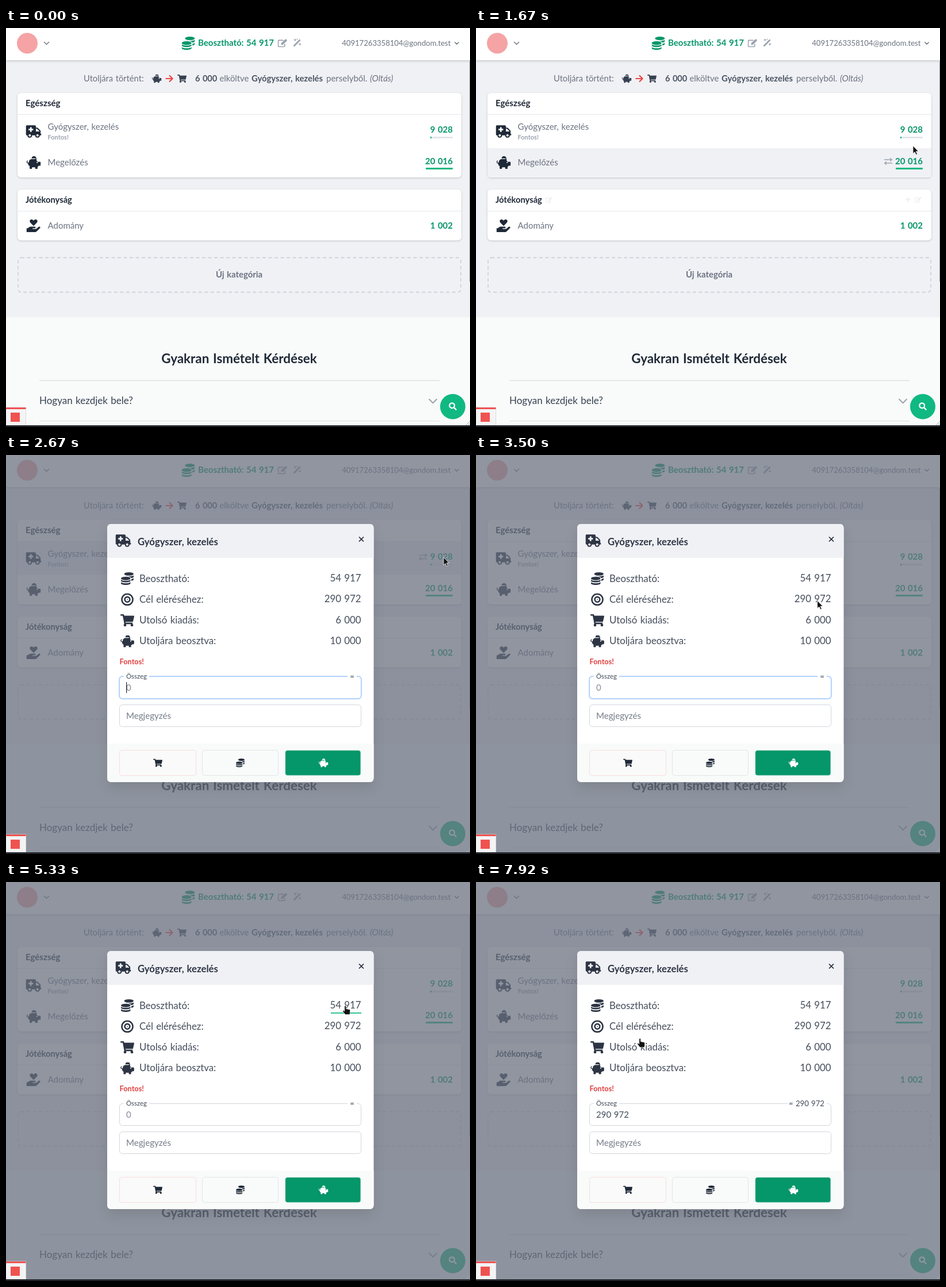
Write an HTML page that moves like this. It is 807 px wide and 694 px high and loops after 8000 ms.

```html
<!DOCTYPE html>
<html lang="hu">
<head>
<meta charset="utf-8">
<style>
  html, body { margin: 0; width: 100%; height: 100%; overflow: hidden; background: #f0f1f5; }
  svg { display: block; }
  text { font-family: Lato, "Open Sans", sans-serif; word-spacing: .06em; white-space: pre; }
  .card { fill: #fff; filter: drop-shadow(0 1px 1.5px rgba(0, 0, 0, .2)); }
</style>
</head>
<body>
<svg id="stage" width="807" height="694" viewBox="0 0 807 694">
  <defs>
    <symbol id="pig" viewBox="0 0 576 512">
      <path fill="currentColor" fill-rule="evenodd" d="M96 224C104 158 155 118 224 118H330C350 104 375 96 416 96L401 162C425 180 440 200 449 224H544c18 0 32 14 32 32v96c0 18-14 32-32 32h-43c-15 20-30 32-53 46v66c0 9-7 16-16 16h-64c-9 0-16-7-16-16v-48H224v48c0 9-7 16-16 16h-64c-9 0-16-7-16-16v-98C90 385 64 345 64 288H50C18 284 0 260 0 232C0 200 24 176 56 176v32C40 208 32 218 32 232c0 14 10 24 24 24h34zM432 224a24 24 0 1 0 1 0z"/>
      <path fill="currentColor" d="M208 94a96 96 0 0 1 192-4c-60-2-130-6-192 4z"/>
    </symbol>
    <symbol id="truck" viewBox="0 0 640 512">
      <path fill="currentColor" fill-rule="evenodd" d="M624 352h-16V244q0-20-14-34L494 110q-14-14-34-14h-44V48q0-48-48-48H48Q0 0 0 48v320q0 48 48 48h16a96 96 0 0 0 192 0h128a96 96 0 0 0 192 0h48q16 0 16-16v-32q0-16-16-16zM160 464a48 48 0 1 1 1 0zM480 464a48 48 0 1 1 1 0zM416 144h44l100 100v12H416zM176 80h64v64h64v64h-64v64h-64v-64h-64v-64h64z"/>
    </symbol>
    <symbol id="coins" viewBox="0 0 512 512">
      <g fill="currentColor">
        <ellipse cx="320" cy="68" rx="192" ry="68"/>
        <path d="M512 128v52c0 26-36 44-90 56c-20-40-110-72-190-70l-60-20c40 14 90 22 148 22c80 0 150-14 192-40z"/>
        <path d="M512 240v50c0 24-40 46-96 56v-66c40-8 74-22 96-40z"/>
        <ellipse cx="192" cy="250" rx="192" ry="70"/>
        <path id="band" d="M0 300c40 30 110 46 192 46s152-16 192-46v42c0 38-86 66-192 66S0 380 0 342z"/>
        <use href="#band" y="104"/>
      </g>
    </symbol>
    <symbol id="cart" viewBox="0 0 576 512">
      <path fill="currentColor" d="M24 0h102q20 0 24 19l9 45h393q28 0 23 29l-47 208q-4 19-23 19H212l6 32h269q27 0 23 29l-6 36H164L94 64H24Q0 64 0 40V24Q0 0 24 0z"/>
      <g fill="currentColor"><circle cx="192" cy="456" r="56"/><circle cx="480" cy="456" r="56"/></g>
    </symbol>
    <symbol id="give" viewBox="0 0 576 512">
      <path fill="currentColor" d="M275 250L160 134C120 90 126 34 164 10c38-24 82-8 124 34c42-42 86-58 124-34c38 24 44 80 4 124L301 250q-13 12-26 0z"/>
      <path fill="currentColor" d="M0 352h56l46-38q36-26 74-26h160c24 0 40 22 32 44c-6 14-18 20-32 20h-80q-14 0-14 16t14 16h110q22 0 36-12l94-76c38-24 80 14 58 48L408 488q-26 24-56 24H16q-16 0-16-16z"/>
    </symbol>
    <symbol id="goal" viewBox="0 0 24 24">
      <g fill="none" stroke="currentColor" stroke-width="2.8"><circle cx="12" cy="12" r="10.4"/><circle cx="12" cy="12" r="4.8"/></g>
      <circle cx="12" cy="12" r="1" fill="currentColor"/>
    </symbol>
    <symbol id="arrow" viewBox="0 0 16 16">
      <path fill="none" stroke="currentColor" stroke-width="2.3" stroke-linecap="round" stroke-linejoin="round" d="M2 8H14M8.6 2.6L14 8L8.6 13.4"/>
    </symbol>
    <symbol id="swap" viewBox="0 0 16 14">
      <path fill="none" stroke="currentColor" stroke-width="1.4" d="M1 4H14M11 1.2L14.4 4L11 6.8M15 10H2M5 7.2L1.6 10L5 12.8"/>
    </symbol>
    <symbol id="edit" viewBox="0 0 18 16">
      <path fill="none" stroke="currentColor" stroke-width="1.8" stroke-linecap="round" d="M10 3H2.4Q1 3 1 4.4V13.6Q1 15 2.4 15H11.6Q13 15 13 13.6V10.5"/>
      <path fill="currentColor" d="M13.8 1.2q1-.9 2 0l1 1q.9 1 0 2L9.8 11.2l-3.6.5l.4-3.4z"/>
    </symbol>
    <symbol id="wand" viewBox="0 0 16 16">
      <path stroke="currentColor" stroke-width="3" stroke-linecap="round" d="M2.5 13.5L12.5 3.5"/>
      <path fill="currentColor" d="M4 0l.8 2.2L7 3l-2.2.8L4 6l-.8-2.2L1 3l2.2-.8zM13 8l.8 2.2l2.2.8l-2.2.8L13 14l-.8-2.2L10 11l2.2-.8zM8 0l.5 1.2l1.2.5l-1.2.5L8 3.4l-.5-1.2l-1.2-.5l1.2-.5z"/>
    </symbol>
    <symbol id="down" viewBox="0 0 16 16">
      <path fill="none" stroke="currentColor" stroke-width="1.9" stroke-linecap="round" stroke-linejoin="round" d="M2 5L8 11L14 5"/>
    </symbol>
    <symbol id="find" viewBox="0 0 16 16">
      <path fill="none" stroke="currentColor" stroke-width="2.6" stroke-linecap="round" d="M10.2 10.2L14.5 14.5M11.5 6.5a5 5 0 1 0-10 0a5 5 0 1 0 10 0"/>
    </symbol>
    <symbol id="plus" viewBox="0 0 16 16">
      <path stroke="currentColor" stroke-width="3" d="M8 1V15M1 8H15"/>
    </symbol>
  </defs>
</svg>
<script>
const stage = document.getElementById('stage');
const DARK = '#1f2937', INK = '#374151', SOFT = '#434c5a', GRAY = '#6b7280', PALE = '#9ca3af';
const GREEN = '#059669', MINT = '#10b981';

const icon = (id, cx, cy, w, color, h = w) =>
  `<use href="#${id}" x="${cx - w / 2}" y="${cy - h / 2}" width="${w}" height="${h}" color="${color}"/>`;
const text = (x, y, size, color, str, weight = 400, anchor = 'start', more = '') =>
  `<text x="${x}" y="${y}" font-size="${size}" fill="${color}" font-weight="${weight}" text-anchor="${anchor}" ${more}>${str}</text>`;
const rect = (x, y, w, h, fill, more = '') =>
  `<rect x="${x}" y="${y}" width="${w}" height="${h}" fill="${fill}" ${more}/>`;
const group = (id, inner) => `<g id="${id}">${inner}</g>`;
const box = (y, stroke, more = '') =>
  rect(197.5, y, 420, 38, '#fff', `rx="5" stroke="${stroke}" ${more}`);

const header =
  rect(0, 0, 807, 56, '#fff', 'style="filter:drop-shadow(0 1px 2px rgba(0,0,0,.22))"') +
  '<circle cx="37" cy="26.5" r="18" fill="#f5a3a4"/>' +
  icon('down', 70.5, 26.5, 11, GRAY) +
  icon('coins', 317, 26.5, 23, GREEN) +
  text(334, 31, 15, GREEN, 'Beosztható: 54 917', 700) +
  icon('edit', 481, 26, 17, PALE, 15) + icon('wand', 506.5, 25.5, 15, PALE) +
  text(773.5, 31, 13.1, GRAY, '40917263358104@gondom.test', 400, 'end') +
  icon('down', 784, 26.5, 9, INK);

const lastEvent =
  text(135, 93, 14.7, GRAY, 'Utoljára történt:') +
  icon('pig', 262, 88, 17, INK, 15) + icon('arrow', 284, 88, 15, '#ef4444') + icon('cart', 306, 88, 16, INK, 14.5) +
  text(329, 93, 14.6, '#4b5563', '6 000', 700) +
  text(371.5, 93, 14.8, GRAY, 'elköltve') +
  text(427, 93, 14.8, '#4b5563', 'Gyógyszer, kezelés', 700) +
  text(557, 93, 15, GRAY, 'perselyből.') +
  text(633, 93, 15, GRAY, '(Oltás)', 400, 'start', 'font-style="italic"');

const hover = (id, y, h, swapX, swapY) =>
  group(id, rect(20, y, 772, h, '#f0f1f5') + icon('swap', swapX, swapY, 16, PALE, 14));

const cards =
  rect(20, 113, 772, 147, '#fff', 'rx="6" class="card"') +
  hover('rowCare', 151, 57.5, 725.5, 177.5) + hover('rowPrevent', 209, 50.5, 717, 232) +
  rect(20, 150, 772, 1, '#e5e7eb') +
  text(34, 136, 15.1, DARK, 'Egészség', 700) +
  icon('truck', 48, 180, 27, DARK, 22) +
  text(72.5, 177, 15, GRAY, 'Gyógyszer, kezelés') + text(72.5, 194, 11, PALE, 'Fontos!', 700) +
  text(777, 182, 15, GREEN, '9 028', 700, 'end') +
  rect(738, 189, 39, 3, '#e2e5e9', 'rx="1"') + rect(738, 189, 2, 3, MINT) +
  icon('pig', 48, 234, 25, DARK, 22) + text(72.5, 239, 15, GRAY, 'Megelőzés') +
  text(777, 237, 15, GREEN, '20 016', 700, 'end') + rect(730, 243, 47, 3, MINT, 'rx="1"') +
  rect(20, 281, 772, 88.5, '#fff', 'rx="6" class="card"') +
  hover('rowGift', 319, 50, 726, 343) +
  rect(20, 318, 772, 1, '#e5e7eb') +
  text(34, 304, 14.7, DARK, 'Jótékonyság', 700) +
  group('tools', icon('edit', 127, 299, 12, PALE) + icon('plus', 751, 298.5, 10, PALE) + icon('edit', 769, 298.5, 12, PALE)) +
  icon('give', 48, 344, 25, DARK, 22) + text(72.5, 348.5, 15, GRAY, 'Adomány') +
  text(777, 348.5, 15, GREEN, '1 002', 700, 'end') +
  rect(21, 399.5, 770, 60, 'none', 'rx="5" stroke="#d0d3d9" stroke-width="1.8" stroke-dasharray="6 4.5"') +
  text(405.5, 434, 14.9, GRAY, 'Új kategória', 700, 'middle');

const faq =
  rect(0, 503, 807, 191, '#f9fbfa') +
  text(405.5, 583, 22.4, DARK, 'Gyakran Ismételt Kérdések', 700, 'middle') +
  rect(58, 612.5, 696, 1.5, '#dfe2e5') +
  text(58, 654, 17, INK, 'Hogyan kezdjek bele?') +
  icon('down', 742.5, 649, 17, PALE) +
  rect(58, 683, 696, 1.2, '#dfe2e5') +
  `<circle cx="777" cy="658.5" r="22" fill="${MINT}"/>` + icon('find', 777, 658, 14, '#fff');

const infoRows = [
  ['coins', 'Beosztható:', '54 917', 22], ['goal', 'Cél eléréséhez:', '290 972', 22],
  ['cart', 'Utolsó kiadás:', '6 000', 22], ['pig', 'Utoljára beosztva:', '10 000', 21]
].map(([id, label, value, h], i) => {
  const y = 215 + i * 36.3;
  return icon(id, 211, y, id === 'goal' ? 22 : 24, '#2d3544', h) +
    text(232, y + 5.5, 16.8, SOFT, label) + text(617.5, y + 5, 16.8, SOFT, value, 400, 'end');
}).join('');

const buttons =
  rect(197.5, 513.5, 133, 44, '#fafafa', 'rx="4" stroke="#f8dede"') + icon('cart', 264, 535.5, 16, DARK, 14.5) +
  rect(341.5, 513.5, 132, 44, '#f9fafa', 'rx="4" stroke="#e2e4e8"') + icon('coins', 407.5, 535.5, 15, DARK) +
  rect(486, 514, 130.5, 43, GREEN, 'rx="3.5" stroke="#5dba9c" stroke-width=".8"') + icon('pig', 552, 535.5, 17, '#fff', 15);

const modal =
  rect(0, 0, 807, 694, '#6b7280', 'opacity=".75"') +
  rect(176, 120, 463.5, 449, '#fff', 'rx="7" style="filter:drop-shadow(0 10px 10px rgba(0,0,0,.1))"') +
  '<path fill="#f0f1f5" d="M176 179V127q0-7 7-7H632.5q7 0 7 7V179z"/>' +
  '<path fill="#f9fafa" d="M176 502V562q0 7 7 7H632.5q7 0 7-7V502z"/>' +
  icon('truck', 204, 149, 27, '#2d3544', 22) +
  text(229, 157, 16.7, '#2d3544', 'Gyógyszer, kezelés', 700) +
  '<path stroke="#1f2937" stroke-width="1.7" d="M614 142.5L622 150.5M622 142.5L614 150.5"/>' +
  infoRows +
  rect(565, 227, 53, 1.7, MINT, 'id="lineAll"') + rect(555, 263.3, 63, 1.7, MINT, 'id="lineGoal"') +
  text(197.5, 364, 12.8, '#e0403f', 'Fontos!', 700) +
  box(385.5, '#d1d5db') +
  group('focus', box(385.5, '#a4cafe', 'stroke-width="3.4" stroke-opacity=".6"') + box(385.5, '#a4cafe')) +
  rect(205, 382, 44, 6, '#fff') + text(209, 389, 11.4, SOFT, 'Összeg') +
  rect(0, 382, 0, 6, '#fff', 'id="sumGap"') + text(606, 390, 13.2, SOFT, '=', 400, 'end', 'id="sum"') +
  text(209, 410, 15, SOFT, '0', 400, 'start', 'id="amount"') +
  rect(209, 395, 1.2, 19, DARK, 'id="caret"') +
  box(434.5, '#d1d5db') + text(209, 459, 15.1, '#757c88', 'Megjegyzés') +
  buttons;

const corner =
  rect(0, 660, 34.5, 31, '#f4f4f5', 'stroke="#dcdcdf"') + rect(0, 660, 34.5, 3, '#ef5350') +
  rect(8, 669, 16, 16, '#ef5350') +
  '<path stroke="#9ca3af" d="M800 691L807 684M804 691L807 688"/>' +
  rect(0, 691, 807, 3, '#22262b');

const pointers =
  group('arrowTip', '<path fill="#111" stroke="#fff" stroke-width=".8" d="M0 0V13.5L3.2 10.7L5.4 15.5L7.6 14.5L5.4 9.8H9.6z"/>') +
  group('handTip', '<path fill="#111" stroke="#fff" stroke-width=".6" d="M-1.2 1q1.3-2 2.6 0V5.5l6 1.2q1.4.6 1.2 2L8 15.5H0L-4.5 9.5q.8-1.6 2.4-.6l.9.9z"/>');

stage.insertAdjacentHTML('beforeend',
  rect(0, 0, 807, 694, '#f0f1f5') + faq + header + lastEvent + cards +
  rect(806, 57, 1, 384, '#a0a4ab') + group('modal', modal) + corner + pointers);

const el = {};
stage.querySelectorAll('[id]').forEach(n => el[n.id] = n);

const STEP = 1000 / 12, LOOP = 8000;
// time, x, y of the pointer's hot spot
const path = [
  [83, 786, 645], [420, 779, 560], [830, 770, 366], [1170, 766, 325], [1330, 763, 296],
  [1500, 761, 262], [1667, 760, 205], [1830, 760, 188], [2083, 761, 178], [3167, 761, 178],
  [3917, 361, 358], [4170, 361, 358], [5083, 590, 215], [5917, 590, 215], [6500, 586, 249],
  [7500, 586, 249], [7917, 285, 272], [8000, 270, 274]
];

function pointerAt(t) {
  const i = Math.max(1, path.findIndex(p => p[0] >= t));
  const [t0, x0, y0] = path[i - 1], [t1, x1, y1] = path[i];
  let k = Math.min(1, Math.max(0, (t - t0) / (t1 - t0)));
  if (t0 > 3000) k = k * k * (3 - 2 * k);
  return [x0 + (x1 - x0) * k, y0 + (y1 - y0) * k];
}

const show = (node, on) => node.setAttribute('visibility', on ? 'inherit' : 'hidden');
const span = (t, a, b) => t >= a && t < b;

function draw(now) {
  const t = Math.floor((now % LOOP + 5) / STEP) * STEP + 1;
  const [x, y] = pointerAt(t);
  const hand = t > 4910;
  for (const n of [el.arrowTip, el.handTip]) n.setAttribute('transform', `translate(${x} ${y})`);
  show(el.arrowTip, t > 80 && !hand);
  show(el.handTip, hand);

  show(el.rowGift, span(t, 830, 1245));
  show(el.rowPrevent, span(t, 1580, 1745));
  show(el.rowCare, span(t, 1745, 3245));
  const fade = t < 1495 ? (t - 1245) / 160 : (1750 - t) / 250;
  el.tools.setAttribute('opacity', Math.min(1, Math.max(0, fade)) * .5);

  show(el.modal, t > 2660);
  show(el.lineAll, span(t, 4910, 6080));
  show(el.lineGoal, span(t, 6080, 7660));
  show(el.focus, t < 5330);
  show(el.caret, t < 5330 && Math.floor((t - 2667) / 500) % 2 === 0);

  const value = t < 5495 ? '' : t < 7495 ? '54 917' : '290 972';
  el.amount.textContent = value || '0';
  el.amount.setAttribute('fill', value ? SOFT : '#858c98');
  el.sum.textContent = value ? '= ' + value : '=';
  const left = value ? (t < 7495 ? 549.5 : 542) : 594;
  el.sumGap.setAttribute('x', left);
  el.sumGap.setAttribute('width', 610 - left);
}

function tick() {
  draw(performance.now());
  requestAnimationFrame(tick);
}
tick();
</script>
</body>
</html>
```
